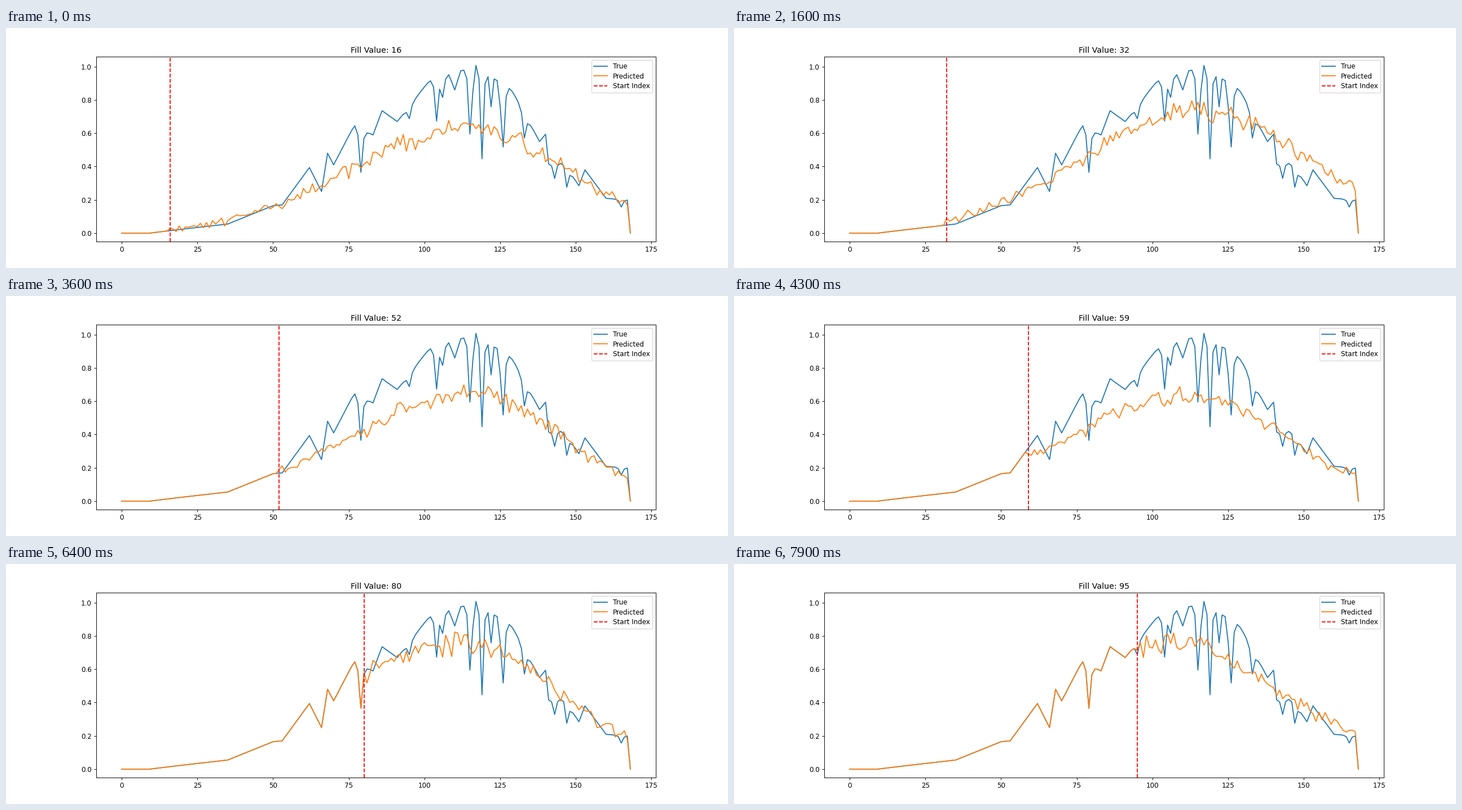
Recreate the animation shown at these times as a matplotlib script. Size 1280 by 427 pixels, loop 8 s.

```python
import matplotlib.pyplot as plt
import numpy as np
from matplotlib.animation import FuncAnimation

FIRST_FILL = 16
FRAMES = 80
INTERVAL = 100
LAST = 168
Y_MAX = 1.008

# Turning points (index, thousandths) of the measured day.
SKY = [(0, 0), (9, 0), (18, 20), (35, 55), (50, 165), (53, 170), (62, 394),
       (66, 250), (68, 480), (70, 410), (77, 655), (83, 590), (86, 735),
       (91, 670), (102, 925), (108, 956), (110, 860), (112, 978),
       (117, 1070), (123, 980), (128, 885), (131, 790), (138, 550),
       (140, 595), (141, 420), (146, 430), (151, 285), (153, 380),
       (160, 209), (167, 201), (168, 0)]

# Short sharp dips (index, depth in thousandths).
DIPS = [(79, 268), (95, 75), (104, 258), (106, 120), (115, 415), (116, 110),
        (119, 590), (122, 230), (125, 100), (126, 385), (133, 150),
        (143, 95), (147, 125), (165, 46)]

# How the forecast hump changes with the fill value.
FILLS = [16, 32, 44, 52, 67, 80, 95]
PEAK = [0.635, 0.735, 0.71, 0.645, 0.62, 0.76, 0.755]
CENTER = [115, 115, 115, 115, 108, 110, 106]
FALL = [32, 36, 36, 30, 36, 34.5, 38]
RISE = 39

x = np.arange(LAST + 1)


def measured():
    """Piecewise linear day with narrow exponential dips."""
    y = np.interp(x, *zip(*SKY))
    for index, depth in DIPS:
        y -= depth * np.exp(-1.6 * np.abs(x - index))
    y[-1] = 0
    return np.maximum(y, 0) / 1000


def forecast(fill):
    """Known values up to the fill index, then a noisy two-sided bell."""
    peak, center, fall = (np.interp(fill, FILLS, v)
                          for v in (PEAK, CENTER, FALL))
    width = np.where(x < center, RISE, fall)
    mean = peak * np.exp(-0.5 * ((x - center) / width) ** 2)
    noise = np.random.default_rng(fill).normal(0, 1, x.size).clip(-2.4, 1.8)
    guess = np.maximum(mean + noise * (0.012 + 0.03 * mean), 0.01)
    guess[-1] = 0
    return np.where(x < fill, true, guess)


true = measured()

fig, ax = plt.subplots(figsize=(15, 427 * 15 / 1280), dpi=1280 / 15)
fig.subplots_adjust(left=0.125, right=0.9, bottom=0.11, top=0.88)

ax.plot(x, true, label="True")
pred_line, = ax.plot(x, forecast(FIRST_FILL), label="Predicted")
start_line = ax.axvline(FIRST_FILL, color="r", linestyle="--",
                        label="Start Index")
title = ax.set_title(f"Fill Value: {FIRST_FILL}")
ax.set_xlim(-0.05 * LAST, 1.05 * LAST)
ax.set_ylim(-0.05 * Y_MAX, 1.05 * Y_MAX)
ax.legend(loc="upper right", labelspacing=0.4)


def update(i):
    fill = FIRST_FILL + i
    pred_line.set_ydata(forecast(fill))
    start_line.set_xdata([fill, fill])
    title.set_text(f"Fill Value: {fill}")
    return pred_line, start_line, title


anim = FuncAnimation(fig, update, frames=FRAMES, interval=INTERVAL,
                     repeat=True, repeat_delay=0)
plt.show()
```
